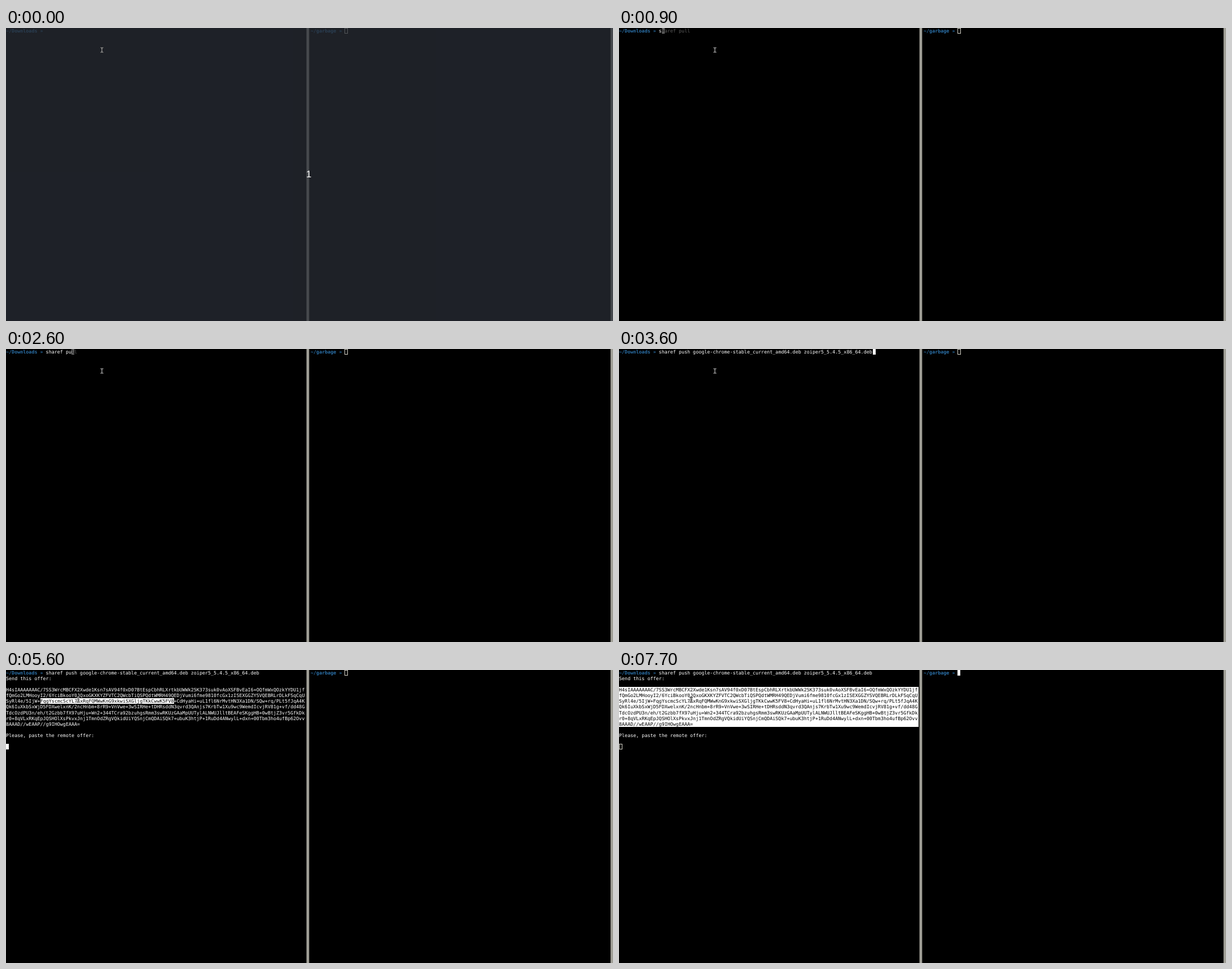
Write an HTML page that moves like this. It is 1076 px wide and 520 px high and loops after 8000 ms.

```html
<!DOCTYPE html>
<html lang="en">
<head>
<meta charset="utf-8">
<title>Terminal push session</title>
<style>
  html, body { margin: 0; width: 100%; height: 100%; overflow: hidden; background: #000; }
  #stage {
    position: relative; width: 1076px; height: 520px; overflow: hidden; background: #000; color: #fff;
    font: 8.4px/10.08px "DejaVu Sans Mono", monospace;
    text-rendering: geometricPrecision; font-variant-ligatures: none;
  }
  #stage > * { position: absolute; }
  .row { white-space: pre; height: 10.08px; }
  .row b { color: #2b70a8; }
  .hint { color: #5a5a5a; }
  .mark { background: #fff; color: #000; height: 10.08px; white-space: pre; }
  .cursor { width: 5.06px; height: 10.08px; box-sizing: border-box; background: #fff; color: #000; white-space: pre; }
  .cursor.ghost { background: #666; }
  .cursor.hollow { width: 6px; height: 10.4px; background: none; border: 1px solid #d5d3c8; }
  .bar { top: 0; width: 4px; height: 520px; background: #a09f97; box-shadow: -1px 0 #3c3b37, 1px 0 #3c3b37; }
  #veil { inset: 0; background: rgba(40, 44, 53, .75); }
  #count { left: 532px; top: 250px; font: 17px/20px "Liberation Sans", sans-serif; color: #fff; }
  #mouse { left: 0; top: 0; overflow: visible; }
</style>
</head>
<body>
<div id="stage">
  <div id="screen"></div>
  <div class="row" style="left:540px;top:0"><b>~/garbage »</b></div>
  <div id="other" class="cursor hollow" style="left:600px;top:0"></div>
  <div class="bar" style="left:533px"></div>
  <div class="bar" style="left:1072px"></div>
  <div id="veil"></div>
  <div id="count">1</div>
  <svg id="mouse" width="1" height="1" fill="none">
    <path id="beam" d="M-2.5 -4H-.8L0 -3.4L.8 -4H2.5M0 -3.4V3.4M-2.5 4H-.8L0 3.4L.8 4H2.5" stroke="#000" stroke-width="2.2"/>
    <use href="#beam" style="stroke:#fff"/>
    <path d="M-2.5 -4H-.8L0 -3.4L.8 -4H2.5M0 -3.4V3.4M-2.5 4H-.8L0 3.4L.8 4H2.5" stroke="#e8e8e8" stroke-width="1"/>
  </svg>
</div>
<script>
const LOOP = 8000, CW = 5.057, RH = 10.08, COLS = 105, START = 14;
const $ = id => document.getElementById(id);

const PULL = 'sharef pull';
const PUSH = 'sharef push google-chrome-stable_current_amd64.deb zoiper5_5.4.5_x86_64.deb';
const OFFER = [
  'H4sIAAAAAAAC/7SS3WrcMBCFX2Xwde1Ksn7sAV94f0xD07BtEspCbhRLXrtkbUWWk25K373suk0vAoXSFBvEaI6+OQfmWxQOzkYYDU1jf',
  'fQmGo2LMHooyI2/6YciBkooY0JQxoGKXKYZFVTC2QWcbTiQSPQdtWMRH49QEDjVumi6fme9810fcGx1zISEXGGZYSVQEBRLrDLkFSqCqU',
  'SyRl4e/5IjW+FqgYscmcScYL7ExRqFQMWwKnG9xkwiSXGljgTKkCwwK5FV8+CdHyaHi+uL1fl6NrMvtHN3Xa1DN/SQw+rq/PLt5fJqA4K',
  'Qk6IuXkbSxWjD5FDXwelxnK/2ncHnbm+8rR9+VnVwe+3wSIRHe+tDHRsddN3qvrd3QAnjs7KrbTw1Xu9wc9WemdIcvjRV81g+vf/dd48G',
  'TdcOzdPU3n/eh/t2Gzbb7fX97uHju+Wn2+344TCra92bzuhgsRmm3swRKUzGAaMpUUTylALNWUJlltBEAFeSKggHB+0wBtjZ3vr5GfkDk',
  'r0+8qVLxRKqEpJQSHOlXsPkvxJnj1TmnOdZRgVQkidUiYQSnjCmQDAiSQk7+ubuK3htjP+1RuDd4ANwylL+dxn+00Tbm3ho4ufBp62Ovv',
  '8AAAD//wEAAP//g9IHOwgEAAA='
];

// Each step: [time, value], held until the next one
const typed = [[0, 0], [900, 1], [1100, 2], [1200, 3], [1300, 4], [1400, 5], [2100, 6], [2200, 7],
  [2300, 8], [2600, 9], [2800, 10], [3000, 11], [3600, PUSH.length]];
const blink = [[0, false], [200, true], [2000, false], [2100, true], [4800, false], [5400, true],
  [7100, false], [7700, true]];
const output = [[0, 0], [4300, 1], [4500, 2]];
const select = [[0, ''], [5600, 'word'], [5800, 'all']];
const mouse = [[0, [170, 39]], [4800, [165, 31]], [4900, [146, 40]], [5000, [131, 50]],
  [5200, [130, 51]], [5300, [129, 52]], [5400, [128, 53]]];

const at = (steps, t) => steps.reduce((v, s) => t >= s[0] ? s[1] : v, steps[0][1]);
const box = (cls, col, row, text, extra = '') =>
  `<div class="${cls}" style="position:absolute;left:${col * CW}px;top:${row * RH}px;${extra}">${text}</div>`;
const line = (row, text) => box('row', 0, row, text);
const mark = (row, from, to) =>
  box('mark', from, row, OFFER[row - 3].slice(from, to), `width:${(to - from) * CW}px`);

function screen(t) {
  const n = at(typed, t), out = at(output, t), sel = at(select, t);
  const goal = t < 2800 ? PULL : PUSH;
  const hint = n ? goal.slice(n) : '';
  let html = line(0, `<b>~/Downloads »</b> ${goal.slice(0, n)}<span class="hint">${hint}</span>`);
  if (out === 2) {
    html += line(1, 'Send this offer:') + line(11, 'Please, paste the remote offer:');
    OFFER.forEach((text, i) => html += line(i + 3, text));
    if (sel === 'word') html += mark(5, 12, 59);
    if (sel === 'all') OFFER.forEach((_, i) => html += mark(i + 3, 0, COLS));
  }
  if (at(blink, t)) {
    const [col, row] = [[START + n, 0], [0, 1], [0, 13]][out];
    const under = out ? '' : hint.charAt(0);
    const look = t >= 7700 ? ' hollow' : under.trim() ? ' ghost' : '';
    html += box('cursor' + look, col, row, under);
  }
  return html;
}

let shown = '';
function draw(now) {
  const t = now % LOOP;
  const html = screen(t);
  if (html !== shown) $('screen').innerHTML = shown = html;
  $('other').className = t < 7700 ? 'cursor hollow' : 'cursor';
  $('veil').hidden = $('count').hidden = t >= 100;
  const [x, y] = at(mouse, t);
  $('mouse').style.transform = `translate(${x}px, ${y}px)`;
}

const begin = performance.now();
function tick() {
  draw(performance.now() - begin);
  requestAnimationFrame(tick);
}
tick();
</script>
</body>
</html>
```
